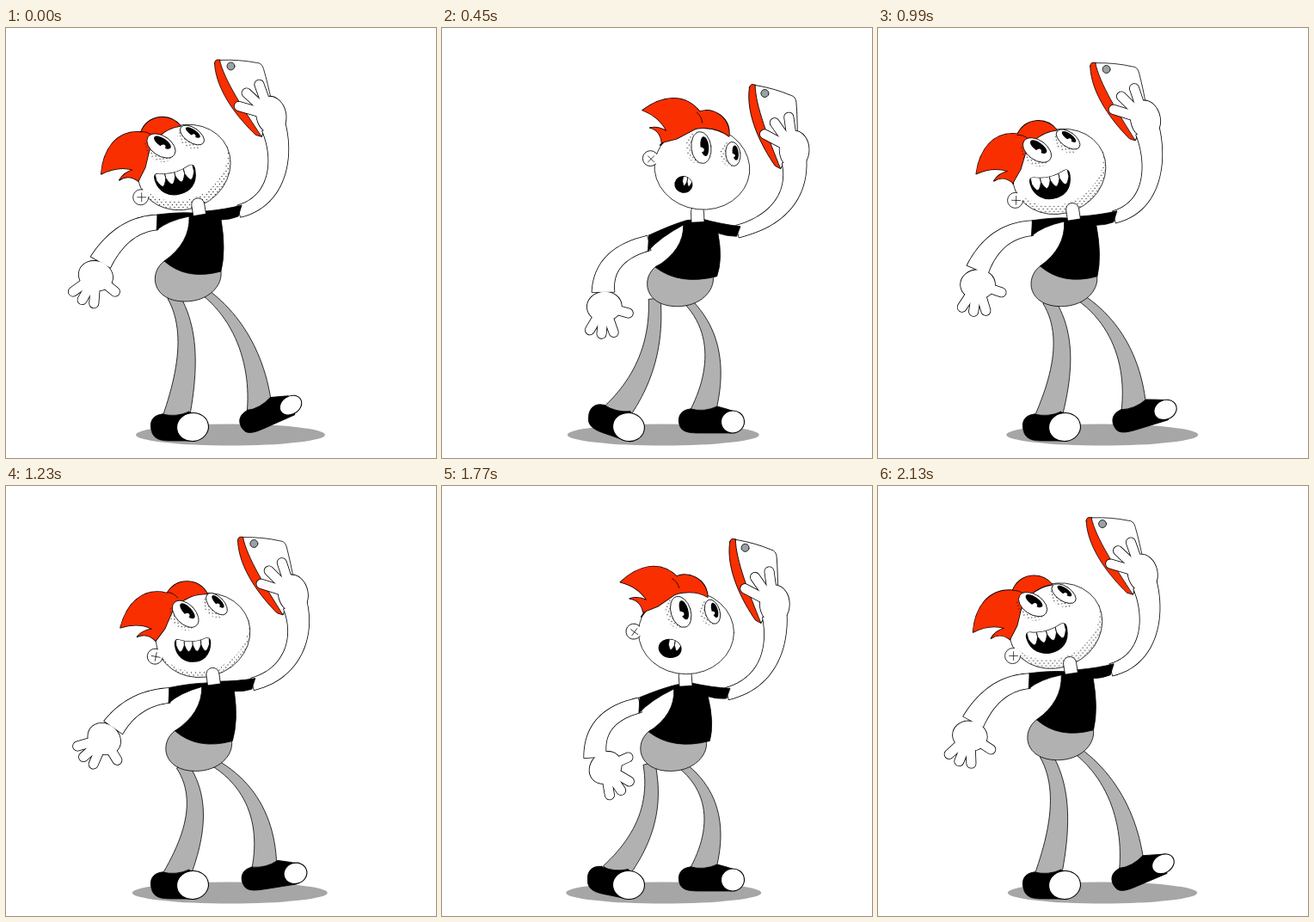
Write an HTML page with a canvas that moves like this. It is 500 by 500 pixels and loops after 2.16 s.

```html
<!DOCTYPE html>
<html lang="en">
<head>
<meta charset="utf-8">
<title>Selfie dance</title>
<style>
html, body { margin: 0; width: 100%; height: 100%; overflow: hidden; background: #fff; }
canvas { display: block; width: 500px; height: 500px; }
</style>
</head>
<body>
<canvas id="stage" width="500" height="500"></canvas>
<script>
const ctx = document.getElementById('stage').getContext('2d');
const PERIOD = 1080, STEP = 30, LINE = .8;
const RED = '#f92f00', GREY = '#b1b1b1', SHADE = '#a6a6a6', INK = '#000', WHITE = '#fff';
const RAD = Math.PI / 180;

// ---- motion: one sway per loop, two dips; parts lead or lag in time ----
const phase = t => 2 * Math.PI * t / PERIOD;
const sway = t => (1 - Math.cos(phase(t))) / 2;
const sink = t => Math.sin(phase(t)) ** 2;
const mix = (a, b, k) => a + (b - a) * k;
const mixAll = (a, b, k) => a.map((v, i) => mix(v, b[i], k));

// ---- drawing helpers ----
function paint(path, fill, line = LINE) {
  if (fill) { ctx.fillStyle = fill; ctx.fill(path); }
  if (line) { ctx.lineWidth = line; ctx.strokeStyle = INK; ctx.stroke(path); }
}
// Overlapping parts share a single outline.
function union(parts, fill) {
  for (const p of parts) paint(p, null, LINE * 2);
  for (const p of parts) paint(p, fill, 0);
}
function oval(x, y, rx, ry, deg = 0) {
  const p = new Path2D();
  p.ellipse(x, y, rx, ry, deg * RAD, 0, 2 * Math.PI);
  return p;
}
function turned(path, deg) {
  const p = new Path2D();
  p.addPath(path, new DOMMatrix().rotate(deg));
  return p;
}
function group(x, y, deg, draw) {
  ctx.save();
  ctx.translate(x, y);
  ctx.rotate(deg * RAD);
  draw();
  ctx.restore();
}
function spot(o, x, y) {
  const c = Math.cos(o.rot * RAD), s = Math.sin(o.rot * RAD);
  return [o.x + x * c - y * s, o.y + x * s + y * c];
}
function capsule(x0, y0, x1, y1, r) {
  const a = Math.atan2(y1 - y0, x1 - x0), p = new Path2D();
  p.arc(x1, y1, r, a - Math.PI / 2, a + Math.PI / 2);
  p.arc(x0, y0, r, a + Math.PI / 2, a + Math.PI * 1.5);
  p.closePath();
  return p;
}
// Tapered tube along a cubic curve.
function limb([a, b, c, d], w0, w1) {
  const left = [], right = [], n = 24;
  for (let i = 0; i <= n; i++) {
    const s = i / n, r = 1 - s;
    const pos = k => r ** 3 * a[k] + 3 * r * r * s * b[k] + 3 * r * s * s * c[k] + s ** 3 * d[k];
    const vel = k => r * r * (b[k] - a[k]) + 2 * r * s * (c[k] - b[k]) + s * s * (d[k] - c[k]);
    const h = mix(w0, w1, s ** 1.4) / 2 / Math.hypot(vel(0), vel(1));
    left.push([pos(0) - vel(1) * h, pos(1) + vel(0) * h]);
    right.unshift([pos(0) + vel(1) * h, pos(1) - vel(0) * h]);
  }
  const p = new Path2D();
  for (const q of [...left, ...right]) p.lineTo(...q);
  p.closePath();
  return p;
}
// Fingers spread from a palm at equal angles.
function fingers(o, x, y, from, step, count, len) {
  return Array.from({ length: count }, (_, i) => {
    const a = (from + step * i) * RAD;
    return capsule(...spot(o, x, y),
      ...spot(o, x + len * Math.cos(a), y + len * Math.sin(a)), 5.2);
  });
}

const dots = (() => {
  const tile = document.createElement('canvas');
  tile.width = 5; tile.height = 6;
  const g = tile.getContext('2d');
  g.fillStyle = '#222';
  for (const [x, y] of [[1.5, 1.5], [4, 4.5]]) {
    g.beginPath();
    g.arc(x, y, .65, 0, 7);
    g.fill();
  }
  return ctx.createPattern(tile, 'repeat');
})();

// ---- legs ----
// A shoe hangs behind its round toe cap.
function shoe(foot, len, deep, capX, capY) {
  group(foot.x, foot.y, foot.rot, () => {
    const heel = -len, ankle = heel + 13;
    paint(new Path2D(`M${ankle} -15 C${heel} -14 ${heel - 2} -4 ${heel} 3
      C${heel + 2} ${deep} ${heel + 14} ${deep} ${heel + 26} ${deep} L0 ${deep} L2 ${-deep + 1}
      Q-6 ${-deep - 2} ${ankle + 31} -18 Q${ankle + 16} -11 ${ankle} -15Z`), INK);
    paint(oval(0, 0, capX, capY, -8), WHITE, 1.1);
  });
}

function leg(from, to, ankle, w0, w1, u, dip) {
  const pts = from.map((p, i) => {
    const [x, y] = mixAll(p, to[i], u);
    return [x + (i ? 11 * dip : 0), y + 23 * dip * (1 - i / 3) ** 1.5];
  });
  paint(limb([...pts, ankle], w0, w1), GREY);
}

function legs(u, dip) {
  const lift = (1 - u) ** 5;
  const heel = { x: 281 + 2 * lift, y: 468 + 3 * lift, rot: -24 * lift };
  const [x, y] = spot(heel, 57, -10);
  const right = { x, y, rot: heel.rot };
  const left = { x: 217, y: 464, rot: 25 * u ** 4 };
  leg([[231, 307], [274, 340], [294, 392]], [[289, 312], [322, 352], [319, 402]],
    spot(right, -35, -10), 9, 29, u, dip);
  leg([[194, 311], [217, 350], [212, 400]], [[251, 309], [250, 370], [230, 415]],
    spot(left, -20, -8), 14, 31, u, dip);
  shoe(right, 62, 13 - lift, 13.5, 13 - 2.5 * lift);
  shoe(left, 48, 16, 18.5, 16.5);
}

// ---- torso ----
function hips(u, dip) {
  group(70 * u, 23 * dip, 0, () => paint(new Path2D(
    'M184 271C165 285 170 318 208 318C235 318 252 300 250 283L217 260Z'), GREY));
}

// Shoulders tip forward and the sleeves droop as the body swings right.
function shirtPoint(t, x, y) {
  const high = Math.min(1, Math.max(0, (275 - y) / 40));
  const u = sway(t + 12 * high);
  return [x + u * (68 + (x - 176) * .09), y + 23 * sink(t) + u * high * Math.abs(x - 224) * .4];
}

function shirt(t) {
  const p = new Path2D(), at = (x, y) => shirtPoint(t, x, y);
  const curve = (cx, cy, x, y) => p.quadraticCurveTo(...at(cx, cy), ...at(x, y));
  p.moveTo(...at(176, 217));
  p.lineTo(...at(175, 235));
  curve(188, 224, 213, 219);
  curve(214, 250, 184, 271);
  curve(210, 294, 250, 283);
  curve(256, 258, 250, 223);
  curve(260, 223, 270, 219);
  p.lineTo(...at(274, 206));
  curve(255, 211, 232, 213);
  p.lineTo(...at(216, 215));
  curve(200, 214, 176, 217);
  paint(p, INK);
}

function neck(t) {
  const u = sway(t + 20);
  group(224.5 + 76 * u, 215 + 3 * u + 22 * sink(t), mix(-9, -2, u), () =>
    paint(new Path2D('M-7.5 2V-9C-7.5 -20 7.5 -20 7.5 -9V2'), WHITE));
}

// ---- arms ----
function freeArm(t) {
  const u = sway(t), late = sway(t - 60);
  const hand = {
    x: 110 + 83 * u,
    y: 271 + 40 * late + 12 * sink(t),
    rot: -3 + 42 * Math.cos(phase(t) - 58 * RAD)
  };
  const hem = shirtPoint(t, 176, 226), wrist = [hand.x, hand.y];
  const elbow = [mix(hem[0], wrist[0], .6 + .5 * late), mix(hem[1], wrist[1], .05 + .2 * u)];
  const pull = p => mixAll(p, elbow, 2 / 3);
  union([
    limb([hem, pull(hem), pull(wrist), wrist], 17, 26),
    oval(...spot(hand, 0, 17), 20, 17, hand.rot),
    ...fingers(hand, 0, 16, 125, -25, 3, 33),
    ...fingers(hand, 0, 17, 20, 0, 1, 29)
  ], WHITE);
}

function phoneArm(t) {
  const phone = {
    x: 261 + 119 * sway(t + 22),
    y: 42.5 + 28 * sway(t + 90) + 22 * sink(t),
    rot: 13.5 * sway(t - 30)
  };
  group(phone.x, phone.y, phone.rot, () => {
    paint(new Path2D('M-19 -3C-17 30 10 62 29 80L36 82L48 44L-12 -7Q-19 -9 -19 -3Z'), RED);
    paint(new Path2D('M-13 -7C-8 16 16 52 36 82L48 44Q43 20 38 3Q36 -4 30 -4Q10 -8 -13 -7Z'), WHITE);
    paint(oval(0, 0, 4.5, 4.5), '#9aa3a3');
  });
  const hem = shirtPoint(t, 271, 213);
  union([
    limb([hem, [hem[0] + 43, hem[1] - 11], spot(phone, 63, 111), spot(phone, 50, 71)], 14, 28),
    oval(...spot(phone, 47, 57), 17, 22, phone.rot - 12),
    ...fingers(phone, 46, 57, 196, 27, 3, 38)
  ], WHITE);
}

// ---- head ----
function eye(x, y, rx, ry, deg) {
  group(x, y, deg, () => {
    const white = oval(0, 0, rx, ry);
    paint(oval(-5, 0, rx + 1.5, ry), dots, 0);
    paint(white, WHITE);
    ctx.save();
    ctx.clip(white);
    paint(oval(rx * .35, -1, rx * .42, ry * .62), INK, 0);
    paint(oval(-rx * .05, ry * .12, rx * .32, ry * .15, 25), WHITE, 0);
    ctx.restore();
  });
}

function mouth(f) {
  const wide = f < .55, w = mix(24, 9.5, f), h = mix(15.5, 9, f);
  const count = wide ? 4 : 2, left = wide ? -.94 : -.2, gap = wide ? .47 : .55;
  group(mix(-8.5, -22, f), mix(16, 19.5, f), Math.min(10, -14 + 50 * f), () => {
    const size = new DOMMatrix().scale(w, h);
    const sized = d => {
      const p = new Path2D();
      p.addPath(new Path2D(d), size);
      return p;
    };
    const lips = wide
      ? sized('M-1 -.4Q-1.03 -1 -.75 -.85Q0 -.45 .75 -.9Q1.03 -1 1 -.5C.95 .6 .5 1 0 1C-.5 1 -.95 .5 -1 -.4Z')
      : oval(0, 0, w, h);
    paint(lips, INK, 1.2);
    ctx.save();
    ctx.clip(lips);
    for (let i = 0; i < count; i++) {
      const x = left + i * gap, mid = x + gap / 2, end = x + gap;
      paint(sized(`M${x} -1V-.4Q${mid - .1} .15 ${mid} .15Q${mid + .1} .15 ${end} -.4V-1Z`), WHITE);
    }
    ctx.restore();
  });
}

const TUFT = new Path2D('M-53 16C-60 11 -68 10 -75 15Q-70 6 -59 3Q-77 -2 -96 8C-94 -19 -80 -43 -50 -41L-36 -38L-45 0Z');
const QUIFF = new Path2D('M-50 -41C-42 -61 -17 -64 -4 -48C-30 -45 -42 -20 -48 -12Q-54 1 -53 16Z');

function hair(turn, flop) {
  union([turned(TUFT, flop), turned(QUIFF, turn)], RED);
  paint(turned(new Path2D('M-50 -41Q-43 -42 -37 -37'), turn));
}

function ear(turn) {
  group(0, 0, turn, () => {
    paint(oval(-50, 35, 9, 9), WHITE, 0);
    const rim = new Path2D();
    rim.arc(-50, 35, 9, 0, 4.9);
    paint(rim);
    paint(new Path2D('M-54 35h10M-49 30v10'), null, .7);
  });
}

function beard(skull, amount, deg) {
  ctx.save();
  ctx.clip(skull);
  const p = new Path2D();
  p.rect(-80, -80, 160, 160);
  p.addPath(oval(-4 * amount, -11 * amount, 56, 49, deg));
  ctx.fillStyle = dots;
  ctx.fill(p, 'evenodd');
  ctx.restore();
}

function head(t) {
  const f = sway(t + 24);
  const tilt = mix(-25, 8, f), look = mix(-56, -5, f), turn = 47 * f;
  group(206.5 + 100 * sway(t + 20), 162 - 5 * sway(t) + 21 * sink(t), 0, () => {
    const skull = oval(0, 0, 55.5, 48.5, tilt);
    paint(skull, WHITE);
    if (f < .7) beard(skull, 1 - f / .7, tilt);
    hair(turn, 52 * sway(t - 15) + 3 * Math.sin(phase(t)));
    ear(turn);
    eye(mix(9.5, 37, f), mix(-37.5, -14.5, f * f), 8.5, mix(16, 14, f), look);
    eye(mix(-26.5, 0, f), mix(-25, -23.5, f), 11.5, 18.5, look);
    mouth(f);
  });
}

function draw(t) {
  const u = sway(t), dip = sink(t);
  ctx.fillStyle = WHITE;
  ctx.fillRect(0, 0, 500, 500);
  paint(oval(261 - 4 * u, 473, 110 + 6 * dip, 12.5), SHADE, 0);
  legs(u, dip);
  hips(u, dip);
  freeArm(t);
  phoneArm(t);
  shirt(t);
  // The raised chin sits behind the neck, the level one in front.
  const parts = sway(t + 24) < .5 ? [head, neck] : [neck, head];
  for (const part of parts) part(t);
}

ctx.lineJoin = ctx.lineCap = 'round';
function tick() {
  const t = performance.now() % PERIOD;
  draw(Math.floor(t / STEP) * STEP);
  requestAnimationFrame(tick);
}
tick();
</script>
</body>
</html>
```
